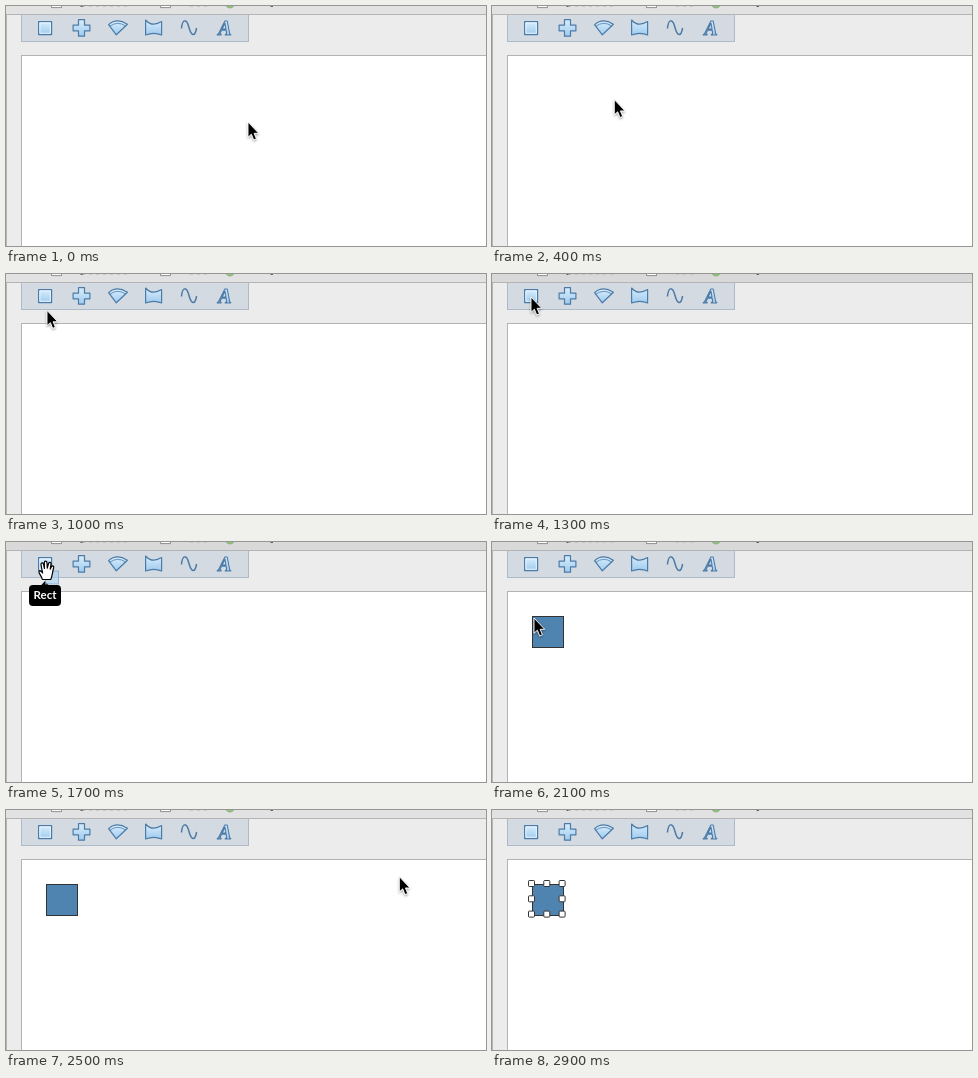
An HTML page for the animation above (3000 ms loop, 480 px wide and 240 px high).

```html
<!DOCTYPE html>
<html lang="en">
<head>
<meta charset="utf-8">
<title>Drag a shape onto the canvas</title>
<style>
  html, body { margin: 0; width: 100%; height: 100%; overflow: hidden; background: #ececec; }
  svg { display: block; width: 100vw; height: 100vh; }
</style>
</head>
<body>
<svg viewBox="0 0 480 240">
  <defs>
    <linearGradient id="blue" x1="0" y1="0" x2="0" y2="1">
      <stop offset="0" stop-color="#d8edfc"/>
      <stop offset="1" stop-color="#9fcbee"/>
    </linearGradient>
    <filter id="soft" x="-60%" y="-40%" width="220%" height="200%">
      <feDropShadow dx="0" dy="1.2" stdDeviation="1" flood-color="#000" flood-opacity=".4"/>
    </filter>
  </defs>

  <rect width="480" height="240" fill="#ececec"/>
  <rect id="bar" width="480" height="8"/>
  <g fill="#fff" stroke="#777" stroke-width=".8">
    <path d="M45.5-1V1.6H55.5V-1M154.5-1V1.6H164.5V-1"/>
    <circle cx="224" cy="-2.6" r="4.6" fill="#8fc47a" stroke="#83ad74"/>
  </g>
  <path d="M74.5 .4h3M264.5 .4h2.5" stroke="#444" stroke-width=".9"/>
  <path d="M76 .5h46M184 .5h18" stroke="#bbb" stroke-width=".6" stroke-dasharray="3 4"/>

  <rect x="15.5" y="8.5" width="227" height="27" fill="#d3dae1" stroke="#aebac8"/>
  <path d="M0 8.5H480" stroke="#b4b4b4"/>
  <path d="M.5 9V240" stroke="#b6b6b6"/>
  <rect x="15.5" y="49.5" width="470" height="196" fill="#fff" stroke="#b3b3b3"/>

  <g fill="url(#blue)" stroke="#4d7ba8" stroke-width="1.2" stroke-linejoin="round">
    <rect x="32.6" y="15.6" width="13" height="13"/>
    <rect x="33.9" y="16.9" width="10.4" height="10.4" fill="none" stroke="#eef7fe" stroke-width=".9"/>
    <path d="M72.5 13.7h6v5.5h5.4v5.6h-5.4v5.4h-6v-5.4h-5.4v-5.6h5.4z"/>
    <path d="M102.6 18.6Q110.5 11.5 121.4 18.2L110.3 28.8Z"/>
    <path d="M103.6 20.4Q111.5 14.5 119.7 20" fill="none" stroke-width=".8"/>
    <path d="M139.6 14Q146 21.5 155.6 15.6V29Q148 25.8 139.6 29Z"/>
    <path d="M175.4 22.5C176.5 12.5 180.6 12.5 183 21.5S189 31 190.6 22" fill="none" stroke-width="1.5"/>
    <text x="219" y="28.6" text-anchor="middle" font-family="'Liberation Serif', serif" font-size="20"
      font-weight="700" font-style="italic" stroke-width="1.1">A</text>
  </g>

  <g id="tip">
    <path d="M35 43.5L39 39L43 43.5Z"/>
    <rect x="23" y="43" width="32" height="21" rx="4"/>
    <text x="39" y="57.4" text-anchor="middle" font-family="Lato, sans-serif" font-size="11.5"
      font-weight="700" fill="#fff">Rect</text>
  </g>

  <rect id="ghost" width="13" height="13" fill="#a9d0f1" fill-opacity=".6" stroke="#7d9dc0" stroke-opacity=".7"/>

  <rect id="shape" x="40.5" y="74.5" width="31" height="31" fill="#4f83b0" stroke="#333"/>
  <g id="handles" fill="#fff" stroke="#333"></g>

  <path id="arrow" d="M0 -1V14.2L3.4 11.2L5.7 16.9L8.4 15.8L6.1 10.3H10.7Z" fill="#000" stroke="#fff"
    stroke-width=".9" filter="url(#soft)"/>
  <path id="hand" d="M-3.6 10.5C-4.2 7-7.6 4.2-7 2.6C-6.3 1.2-4.6 2.4-3.4 4L-5-4.4C-5.2-6.6-3-6.8-2.5-4.8L-1.6-.6L-1.7-6.4C-1.6-8.5 .8-8.5 1-6.4L1.3-.8L2.6-5.6C3.3-7.4 5.4-6.8 5-4.8L4.2 .2L5.5-2.4C6.6-3.8 8.2-2.8 7.6-1C6.4 2.6 6.6 6.4 4.8 10.5Z"
    fill="#fff" stroke="#000" stroke-width="1.2" stroke-linejoin="round"/>
</svg>
<script>
const LOOP = 3000, STEP = 50;
const GRAB = 1400, HOVER = 1500, DRAG = 1650, DROP = 2050, SELECT = 2600;

// time, x, y of the pointer tip
const PATH = [
  [50, 242, 117], [550, 71, 85], [750, 46, 71], [1100, 39, 24],
  [1650, 39, 24], [1700, 40, 27], [2050, 42, 77], [2100, 42, 77],
  [2300, 216, 71], [2600, 482, 66]
];

const $ = id => document.getElementById(id);
const [bar, tip, ghost, shape, handles, arrow, hand] =
  ['bar', 'tip', 'ghost', 'shape', 'handles', 'arrow', 'hand'].map($);

for (let i = 0; i < 9; i++) {
  if (i === 4) continue;
  const h = document.createElementNS('http://www.w3.org/2000/svg', 'rect');
  const set = { x: 36.5 + (i % 3) * 15.3, y: 70.5 + Math.floor(i / 3) * 15.3, width: 6, height: 6, rx: .8 };
  for (const k in set) h.setAttribute(k, set[k]);
  handles.append(h);
}

function pointAt(t) {
  if (t <= PATH[0][0]) return PATH[0].slice(1);
  const i = PATH.findIndex(p => p[0] >= t);
  if (i < 0) return PATH[PATH.length - 1].slice(1);
  const [t0, x0, y0] = PATH[i - 1], [t1, x1, y1] = PATH[i];
  const k = (t - t0) / (t1 - t0);
  return [x0 + (x1 - x0) * k, y0 + (y1 - y0) * k];
}

const show = (el, on) => el.setAttribute('visibility', on ? 'visible' : 'hidden');
const move = (el, x, y) => el.setAttribute('transform', `translate(${x} ${y})`);

function draw(t) {
  const [x, y] = pointAt(t);
  const holding = t >= GRAB && t < DROP;
  move(arrow, x, y);
  move(hand, x, y);
  move(ghost, x - .5, y + 2);
  show(arrow, !holding && t < SELECT);
  show(hand, holding);
  show(tip, t >= HOVER && t <= 1750);
  show(ghost, t >= DRAG && t < DROP);
  show(shape, t >= DROP);
  show(handles, t >= SELECT);
  bar.setAttribute('fill', t >= 1150 && t < 2250 ? '#d9d9d9' : '#e2e2e2');
}

const start = performance.now();
function frame() {
  const t = (performance.now() - start) % LOOP;
  draw(Math.floor(t / STEP) * STEP);
  requestAnimationFrame(frame);
}
frame();
</script>
</body>
</html>
```
